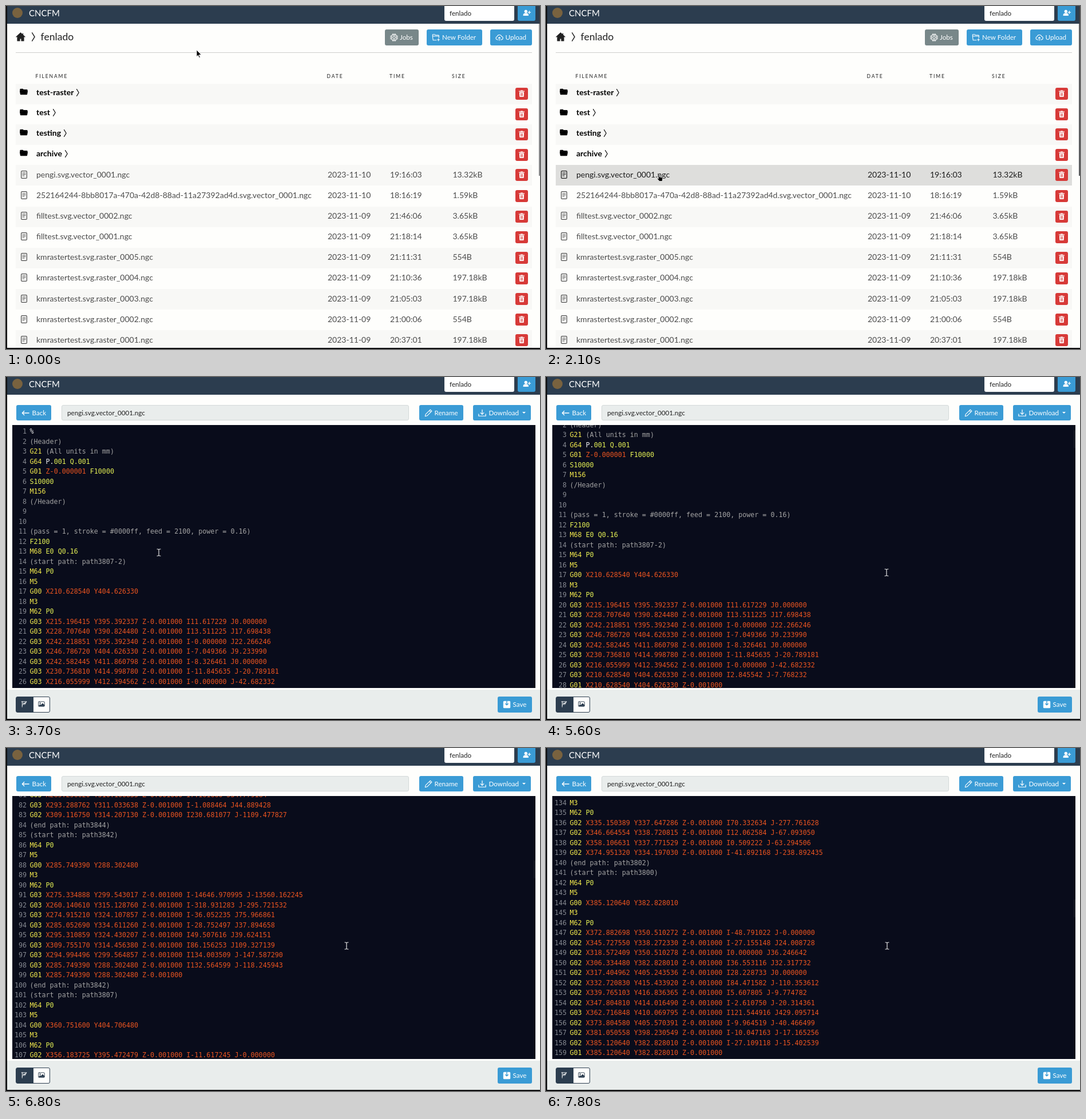
Animation of 933x600 px, one loop 8 s. Source, as an HTML page:

```html
<!DOCTYPE html>
<html lang="en">
<head>
<meta charset="utf-8">
<title>CNCFM</title>
<style>
@property --s { syntax: "<number>"; inherits: true; initial-value: 0; }
html, body { margin: 0; width: 100%; height: 100%; overflow: hidden; }
body { position: relative; background: #fefefc; color: #222; font: 11.67px/20px Lato, sans-serif; }
body * { box-sizing: border-box; }
.abs, .btn, .row, .row > *, .view { position: absolute; white-space: nowrap; }
.view { inset: 0; }
svg { position: absolute; fill: none; stroke: currentColor; stroke-width: 1.2; stroke-linejoin: round; stroke-linecap: round; overflow: visible; }
.solid { fill: currentColor; }
.btn { height: 27.5px; border-radius: 3px; background: #3a9bd5; color: #fff; line-height: 27.5px; }
.btn svg { top: 7px; left: 9px; width: 14px; height: 14px; }

/* chrome */
#nav { left: 0; top: 0; width: 933px; height: 31px; background: #2c3d4f; }
#logo { left: 11px; top: 3px; width: 18px; height: 18px; border-radius: 50%; background: #79623f; }
#brand { left: 40px; top: 1.5px; font-size: 15px; color: #fff; }
#user { left: 766px; top: -4px; width: 122px; height: 30px; padding: 6px 9px; border-radius: 3px; background: #fff; }
.edge { background: #0b0b0d; z-index: 5; }
#bar { left: 931px; top: 0; width: 2px; height: 297px; background: #3c3f44; animation-name: bar; }

/* file list */
#crumb { left: 60.5px; top: 44px; font-size: 17.6px; }
#rule { left: 17px; top: 80.5px; width: 902px; height: 1px; background: #cfcfcd; }
.th { top: 113px; font-size: 8.5px; letter-spacing: 1.9px; }
.row { left: 17px; width: 902px; font-size: 14px; color: #4c4c4c; }
.row:nth-child(odd)::before { content: ""; position: absolute; inset: 0; z-index: -1; background: #f8f8f6; }
.row.dir { color: #000; font-weight: 700; }
.dir svg.sep { position: static; width: 5px; height: 13px; margin-left: 5px; vertical-align: -2px; }
.del { left: 873px; top: 7px; width: 22px; height: 21px; border-radius: 3px; background: #d73a38; color: #fff; }
.del svg { left: 5px; top: 4px; width: 12px; height: 12px; }
#hover { left: 17px; width: 902px; height: 36px; z-index: -1; background: #dededc; animation-name: hover; }
.row:nth-child(5) { animation-name: ink; }

/* editor */
#name { left: 97px; top: 48.9px; width: 607px; height: 27.5px; padding: 2.5px 9px; border: 1px solid #d3d9d9; border-radius: 3px; background: #e9edec; }
#foot { left: 2px; top: 547px; width: 931px; height: 51px; background: #e9edec; }
#modes { left: 17px; top: 559px; width: 60px; height: 28px; border: 1px solid #2c3d4f; border-radius: 3px; background: linear-gradient(90deg, #2c3d4f 30px, #fefefc 30px); }
#caret { left: 902px; top: 61px; border: 3.5px solid transparent; border-top-color: #fff; }
#editor { left: 11px; top: 84px; width: 914px; height: 460px; overflow: hidden; background: #090c1b; animation-name: editor, scroll; }
#code { left: 0; top: 3.3px; transform: translateY(calc(var(--s) * -1px)); font: 11.667px/17.5px "DejaVu Sans Mono", monospace; animation-name: code; }
#code div { height: 17.5px; white-space: pre; color: #f2f2f2; }
#code i { display: inline-block; width: 25px; margin-right: 5.5px; text-align: right; font-style: normal; color: #858890; }
.rem { color: #a3a3a3; }
.cmd { color: #f3e94c; }
.par { color: #e4f055; }
.pos { color: #ea5420; }
#thumb { left: 911px; top: 7px; width: 3px; height: 31px; background: #1a1c25; opacity: var(--s); transform: translateY(calc(var(--s) * .0748px)); }

/* pointer */
#mouse { left: 0; top: 0; z-index: 6; animation-name: move; }
#arrow { animation-name: arrow; }
#hand { left: -3px; animation-name: hand; }
#beam { color: #e6e6e6; animation-name: beam; }

.t { animation: 8s step-end -10ms infinite; }
@keyframes bar {
  0% { opacity: .6 } 1.25% { opacity: .3 } 2.5% { opacity: 0 } 7.5% { opacity: 1 }
  26.25% { opacity: .85 } 30% { opacity: .3 } 31.25%, 100% { opacity: 0 }
}
@keyframes hover {
  0% { top: 136px; opacity: 0 } 11.25% { top: 136px; opacity: 1 } 12.5% { top: 171.7px; opacity: 1 }
  13.75% { top: 207.4px; opacity: 1 } 15% { top: 243px; opacity: 1 } 16.25%, 100% { top: 278.4px; opacity: 1 }
}
@keyframes ink { 0% { color: #4c4c4c } 16.25%, 100% { color: #1c1c1c } }
@keyframes list { 0% { opacity: 1 } 30% { opacity: .4 } 31.25%, 100% { opacity: 0 } }
@keyframes shell { 0% { opacity: 0 } 33.75%, 100% { opacity: 1 } }
@keyframes editor { 0% { opacity: 0 } 35%, 100% { opacity: 1 } }
@keyframes code { 0% { opacity: 0 } 36.25% { opacity: .5 } 37.5%, 100% { opacity: 1 } }
@keyframes scroll {
  0% { --s: 0 } 70% { --s: 29.2 } 71.25% { --s: 190 } 72.5% { --s: 350 }
  76.25% { --s: 435 } 77.5% { --s: 650 } 78.75% { --s: 850 } 80% { --s: 930 }
  82.5% { --s: 1120 } 83.75% { --s: 1340 } 85% { --s: 1413.5 }
  88.75% { --s: 1600 } 90% { --s: 1800 } 91.25% { --s: 1872.5 }
  95% { --s: 2187.5 } 97.5%, 100% { --s: 2327.5 }
}
@keyframes move {
  0% { translate: 333px 77px } 7.5% { translate: 329px 86px } 8.75% { translate: 317px 106px }
  10% { translate: 301px 130px } 11.25% { translate: 283px 160px } 12.5% { translate: 264px 194px }
  13.75% { translate: 246px 228px } 15% { translate: 229px 262px } 16.25% { translate: 215px 286px }
  17.5% { translate: 208px 294px } 18.75% { translate: 201px 294px } 20% { translate: 197px 294px }
  33.75% { translate: 197px 296px } 40% { translate: 203px 297px } 41.25% { translate: 222px 300px }
  42.5% { translate: 244px 305px } 43.75% { translate: 259px 307px } 46.25% { translate: 267px 307px }
  47.5% { translate: 515px 307px } 50% { translate: 850px 206px } 52.5% { translate: 866px 195px }
  53.75% { translate: 890px 178px } 55% { translate: 908px 165px } 57.5% { translate: 918px 160px }
  60% { translate: 921px 158px } 61.25% { translate: 922px 157px } 65% { translate: 880px 185px }
  66.25% { translate: 790px 240px } 67.5% { translate: 680px 305px } 68.75% { translate: 610px 340px }
  70% { translate: 595px 342px } 76.25% { translate: 592px 347px } 80% { translate: 594px 347px }
  82.5% { translate: 595px 346px } 95%, 100% { translate: 596px 346px }
}
@keyframes arrow { 0% { opacity: 1 } 11.25% { opacity: 0 } 31.25% { opacity: 1 } 35%, 100% { opacity: 0 } }
@keyframes hand { 0% { opacity: 0 } 11.25% { opacity: 1 } 31.25%, 100% { opacity: 0 } }
@keyframes beam { 0% { opacity: 0 } 35%, 100% { opacity: 1 } }
</style>
</head>
<body>
<svg width="0" height="0">
  <symbol id="home" viewBox="0 0 16 16"><path class="solid" d="M.5 8 8 1l7.5 7M2.5 8.5 8 3.500l5.500 5V15h-4v-4h-3v4h-4zM12 2v3"/></symbol>
  <symbol id="sep" viewBox="0 0 5 13"><path d="M.5.5 4.200 6.500.500 12.500"/></symbol>
  <symbol id="dir" viewBox="0 0 16 13"><path class="solid" d="M1 2q0-1 1-1h4l1.500 1.500H14q1 0 1 1V4H1zM.6 5h14.800L14.500 11q-.1 1-1 1h-11q-1 0-1-1z"/></symbol>
  <symbol id="doc" viewBox="0 0 11 14"><rect x=".6" y=".6" width="9.8" height="12.8" rx="1.5"/><path d="M3 4h5M3 6.500h5M3 9h3"/></symbol>
  <symbol id="bin" viewBox="0 0 12 12"><path class="solid" d="M2.500 4h7l-.5 7.500H3z"/><path d="M1.500 2.200h9M4.500 1h3"/><path stroke="#d73a38" stroke-width=".8" d="M4.600 5.500v4.500M6 5.500v4.500M7.400 5.500v4.500"/></symbol>
  <symbol id="chip" viewBox="0 0 16 16"><rect x="3" y="3" width="10" height="10" rx="2"/><circle cx="8" cy="8" r="2.5"/><path d="M5.500.5v2M8 .5v2M10.500.5v2M5.500 13.500v2M8 13.500v2M10.500 13.500v2M.5 5.500h2M.5 8h2M.5 10.500h2M13.500 5.500h2M13.500 8h2M13.500 10.500h2"/></symbol>
  <symbol id="add" viewBox="0 0 16 16"><path d="M9 13.500H2.500l-1-8V3q0-1 1-1H6l1.500 1.500H13q1 0 1 1v4M1.500 5.500h13M11 12.500h4.500M13.200 10.300v4.500"/></symbol>
  <symbol id="up" viewBox="0 0 16 16"><path d="M5.500 12.500H4a3.200 3.200 0 0 1-.4-6.300A4.600 4.600 0 0 1 12.400 6a3.300 3.300 0 0 1 0 6.500H10.500M8 14V7.500M5.800 9.500 8 7.300l2.200 2.200"/></symbol>
  <symbol id="back" viewBox="0 0 16 16"><path stroke-width="1.5" d="M15 8H1.500M5.500 4l-4 4 4 4"/></symbol>
  <symbol id="pen" viewBox="0 0 16 16"><path d="m1.500 14.500 1-4L11.800 1.200l3 3L5.500 13.500zM9.800 3.200l3 3"/></symbol>
  <symbol id="down" viewBox="0 0 16 16"><path stroke-width="1.4" d="M1 10v4h14v-4M8 1.500v9M4.800 7.500 8 10.700l3.200-3.200"/></symbol>
  <symbol id="disk" viewBox="0 0 16 16"><rect class="solid" x="1.5" y="1.5" width="13" height="13" rx="1.5"/><path stroke="#3a9bd5" stroke-width="1.6" d="M8 1v7.500M5.300 6.200 8 8.900l2.700-2.700"/></symbol>
  <symbol id="person" viewBox="0 0 16 16"><circle class="solid" cx="6" cy="5" r="2.5"/><path class="solid" d="M1.200 13q0-4 4.800-4t4.800 4z"/><path stroke-width="1.5" d="M13 4.500v5M10.500 7h5"/></symbol>
  <symbol id="path" viewBox="0 0 16 16"><path d="M3 15V2M1.500 2.500h12L6 8M3 11 13 3.500M4.500 6.500h7l-3 3"/></symbol>
  <symbol id="pic" viewBox="0 0 16 16"><rect x="1" y="2.5" width="14" height="11" rx="1.5"/><circle class="solid" cx="5" cy="6" r="1"/><path class="solid" d="m1.500 12.500 3.500-3.500 2 1.500 3.500-4 4 4v2z"/></symbol>
</svg>

<div id="list" class="view t" style="animation-name:list">
  <svg style="left:17px;top:46px;width:17px;height:16px"><use href="#home"/></svg>
  <svg style="left:45px;top:46px;width:6px;height:16px"><use href="#sep"/></svg>
  <div id="crumb" class="abs">fenlado</div>
  <div id="rule" class="abs"></div>
  <div class="abs th" style="left:51.5px">FILENAME</div>
  <div class="abs th" style="left:560.5px">DATE</div>
  <div class="abs th" style="left:670px">TIME</div>
  <div class="abs th" style="left:779px">SIZE</div>
  <div id="rows"></div>
  <div id="hover" class="abs t"></div>
</div>

<div id="shell" class="view t" style="animation-name:shell">
  <div id="name" class="abs">pengi.svg.vector_0001.ngc</div>
  <div id="foot" class="abs"></div>
  <div id="modes" class="abs"></div>
  <svg style="left:26px;top:566px;width:12px;height:12px;color:#fff"><use href="#path"/></svg>
  <svg style="left:56px;top:566px;width:12px;height:12px;color:#2c3d4f"><use href="#pic"/></svg>
</div>
<div id="editor" class="abs t">
  <div id="code" class="abs t"></div>
  <div id="thumb" class="abs"></div>
</div>

<div id="nav" class="abs"></div>
<div id="logo" class="abs"></div>
<div id="brand" class="abs">CNCFM</div>
<div id="user" class="abs">fenlado</div>
<div id="bar" class="abs t"></div>
<div class="abs edge" style="left:0;top:0;width:2px;height:600px"></div>
<div class="abs edge" style="left:0;top:598px;width:933px;height:2px"></div>

<div id="mouse" class="abs t">
  <svg id="arrow" class="t" width="9" height="14"><path fill="#000" stroke="#fff" stroke-width=".8" d="M0 0v11.500l2.600-2.300 2 4.300 1.700-.8-2-4.200H8z"/></svg>
  <svg id="hand" class="t" width="10" height="13"><path fill="#000" stroke="#fff" stroke-width=".7" d="M2.500 1q1-1.500 2 0v4l4 .8q1.500.4 1.300 2L9 12.500H4L.3 8q0-1.500 2.200-.2z"/></svg>
  <svg id="beam" class="t" width="1" height="1"><path d="M-3-6q2.500 0 3 1 .5-1 3-1M0-5v10M-3 6q2.500 0 3-1 .5 1 3 1"/></svg>
</div>

<script>
const $ = id => document.getElementById(id);
const icon = (id, style = '', cls = '') => `<svg class="${cls}" style="${style}"><use href="#${id}"/></svg>`;

function button(parent, x, y, w, name, label = '', textX = 26, style = '') {
  $(parent).insertAdjacentHTML('beforeend',
    `<div class="btn" style="left:${x}px;top:${y}px;width:${w}px;${style}">${icon(name)}<span class="abs" style="left:${textX}px">${label}</span></div>`);
}
button('list', 662, 41.3, 59, 'chip', 'Jobs', 26, 'background:#788789');
button('list', 735, 41.3, 97, 'add', 'New Folder', 27);
button('list', 846, 41.3, 73, 'up', 'Upload', 26.5);
button('shell', 18, 48.9, 61, 'back', 'Back', 27.5);
button('shell', 722, 48.9, 77, 'pen', 'Rename', 26.5);
button('shell', 816, 48.9, 101, 'down', 'Download', 27.5);
button('shell', 859, 559.2, 60, 'disk', 'Save', 26.5);
button('nav', 894, -2, 31, 'person', '', 0, 'height:28px');
$('shell').insertAdjacentHTML('beforeend', '<div id="caret" class="abs"></div>');

// File table
const dirs = ['test-raster', 'test', 'testing', 'archive'];
const files = `pengi.svg.vector_0001.ngc 2023-11-10 19:16:03 13.32kB
252164244-8bb8017a-470a-42d8-88ad-11a27392ad4d.svg.vector_0001.ngc 2023-11-10 18:16:19 1.59kB
filltest.svg.vector_0002.ngc 2023-11-09 21:46:06 3.65kB
filltest.svg.vector_0001.ngc 2023-11-09 21:18:14 3.65kB
kmrastertest.svg.raster_0005.ngc 2023-11-09 21:11:31 554B
kmrastertest.svg.raster_0004.ngc 2023-11-09 21:10:36 197.18kB
kmrastertest.svg.raster_0003.ngc 2023-11-09 21:05:03 197.18kB
kmrastertest.svg.raster_0002.ngc 2023-11-09 21:00:06 554B
kmrastertest.svg.raster_0001.ngc 2023-11-09 20:37:01 197.18kB`.split('\n');
const columns = [36, 545, 654, 763.5];
const del = `<div class="del">${icon('bin')}</div>`;
const row = (cls, top, h, html) => `<div class="row t ${cls}" style="top:${top}px;height:${h}px">${html}${del}</div>`;
$('rows').innerHTML =
  dirs.map((d, i) => row('dir', 136 + i * 35.7, 35.7,
    icon('dir', 'left:7px;top:8px;width:14px;height:12px') +
    `<span style="left:36px;top:4.5px">${d}${icon('sep', '', 'sep')}</span>`)).join('') +
  files.map((f, i) => row('', 278.4 + i * 36.1, 36.1,
    icon('doc', 'left:8.5px;top:9.5px;width:11px;height:14px') +
    f.split(' ').map((s, k) => `<span style="left:${columns[k]}px;top:6.5px">${s}</span>`).join(''))).join('');

// G-code
let seed = 7;
const rnd = (lo, hi) => {
  seed = seed * 16807 % 2147483647;
  return (lo + seed / 2147483647 * (hi - lo)).toFixed(6);
};
const arcs = n => Array.from({ length: n }, () =>
  `G03 X${rnd(200, 380)} Y${rnd(290, 420)} I${rnd(-90, 90)} J${rnd(-120, 60)}`).join('\n');
const start = (id, pos) => `(start path: ${id})\nM64 P0\nM5\nG00 ${pos}\nM3\nM62 P0`;
const end = id => `(end path: ${id})`;

const gcode = `%
(Header)
G21 (All units in mm)
G64 P.001 Q.001
G01 Z-0.000001 F10000
S10000
M156
(/Header)


(pass = 1, stroke = #0000ff, feed = 2100, power = 0.16)
F2100
M68 E0 Q0.16
${start('path3807-2', 'X210.628540 Y404.626330')}
G03 X215.196415 Y395.392337 I11.617229 J0.000000
G03 X228.707640 Y390.824480 I13.511225 J17.698438
G03 X242.218851 Y395.392340 I-0.000000 J22.266246
G03 X246.786720 Y404.626330 I-7.049366 J9.233990
G03 X242.582445 Y411.860798 I-8.326461 J0.000000
G03 X230.736810 Y414.998780 I-11.845635 J-20.789181
G03 X216.055999 Y412.394562 I-0.000000 J-42.682332
G03 X210.628540 Y404.626330 I2.845542 J-7.768232
G01 X210.628540 Y404.626330 Z-0.001000
${end('path3807-2')}
${start('path3804-8', 'X268.833920 Y396.442650')}
G02 X259.824017 Y401.001239 I8.933478 J28.839915
G02 X249.534841 Y408.773074 I364.913160 J493.807444
G03 X239.196115 Y416.056345 I-88.459237 J-114.589743
G03 X232.988780 Y417.458520 I-5.037138 J-7.858259
G03 X200.758022 Y407.551927 I12.313767 J-97.446544
G02 X175.766100 Y400.282760 I-31.637060 J62.173897
${end('path3804-8')}
${start('path3802-8', 'X255.860800 Y333.322470')}
G03 X236.229754 Y337.567138 I-70.332851 J-277.762585
G03 X224.715587 Y338.640669 I-12.062596 J-67.093067
G03 X213.273509 Y337.691383 I-0.509231 J-63.294435
${arcs(1)}
${end('path3802-8')}
${start('path3800-8', 'X186.259600 Y382.747910')}
${arcs(11)}
${end('path3800-8')}
${start('path3844', 'X309.116750 Y314.207130')}
${arcs(3)}
G03 X285.256620 Y310.166835 I7.161660 J34.779184
G03 X293.288762 Y311.033638 I-1.088464 J44.889428
G02 X309.116750 Y314.207130 I230.681077 J-1109.477827
${end('path3844')}
${start('path3842', 'X285.749390 Y288.302480')}
G03 X275.334888 Y299.543017 I-14646.970995 J-13560.162245
G03 X260.140610 Y315.128760 I-318.931283 J-295.721532
G03 X274.915210 Y324.107857 I-36.052235 J75.966861
G03 X285.052690 Y334.611260 I-28.752497 J37.894658
G03 X295.310859 Y324.430207 I49.507616 J39.624151
G03 X309.755170 Y314.456380 I86.156253 J109.327139
G03 X294.994496 Y299.564857 I134.003509 J-147.587290
G03 X285.749390 Y288.302480 I132.564599 J-118.245943
G01 X285.749390 Y288.302480 Z-0.001000
${end('path3842')}
${start('path3807', 'X360.751600 Y404.706480')}
G02 X356.183725 Y395.472479 I-11.617245 J-0.000000
${arcs(8)}
${end('path3807')}
${start('path3804', 'X302.546300 Y396.522800')}
${arcs(6)}
${end('path3804')}
${start('path3802', 'X315.519400 Y333.402620')}
G02 X335.150389 Y337.647286 I70.332634 J-277.761628
G02 X346.664554 Y338.720815 I12.062584 J-67.093050
G02 X358.106631 Y337.771529 I0.509222 J-63.294506
G02 X374.951320 Y334.197030 I-41.892168 J-238.892435
${end('path3802')}
${start('path3800', 'X385.120640 Y382.828010')}
G02 X372.882698 Y350.510272 I-48.791022 J-0.000000
G02 X345.727550 Y338.272330 I-27.155148 J24.008728
G02 X318.572409 Y350.510278 I0.000000 J36.246642
G02 X306.334480 Y382.828010 I36.553116 J32.317732
G02 X317.404962 Y405.243536 I28.228733 J0.000000
G02 X332.720830 Y415.433920 I84.471582 J-110.353612
G02 X339.765103 Y416.836365 I5.607805 J-9.774782
G02 X347.804810 Y414.016490 I-2.610750 J-20.314361
G03 X362.716848 Y410.069795 I121.544916 J429.095714
G02 X373.804580 Y405.570391 I-9.964519 J-40.466499
G02 X381.050558 Y398.230549 I-10.047163 J-17.165256
G02 X385.120640 Y382.828010 I-27.109118 J-15.402539
G01 X385.120640 Y382.828010 Z-0.001000`.replace(/ I/g, ' Z-0.001000 I');

const span = (cls, s) => `<span class="${cls}">${s}</span>`;
const paint = line => line.replace(/\(.*\)|[A-Z]\S*/g, s =>
  s[0] === '(' ? span('rem', s) :
  /^[GM]/.test(s) ? span('cmd', s) :
  /^[XYZIJ]/.test(s) ? span('pos', s) :
  s.startsWith('P.') ? 'P.' + span('par', s.slice(2)) : span('par', s));
$('code').innerHTML = gcode.split('\n').map((l, i) => `<div><i>${i + 1}</i>${paint(l)}</div>`).join('');
</script>
</body>
</html>
```
